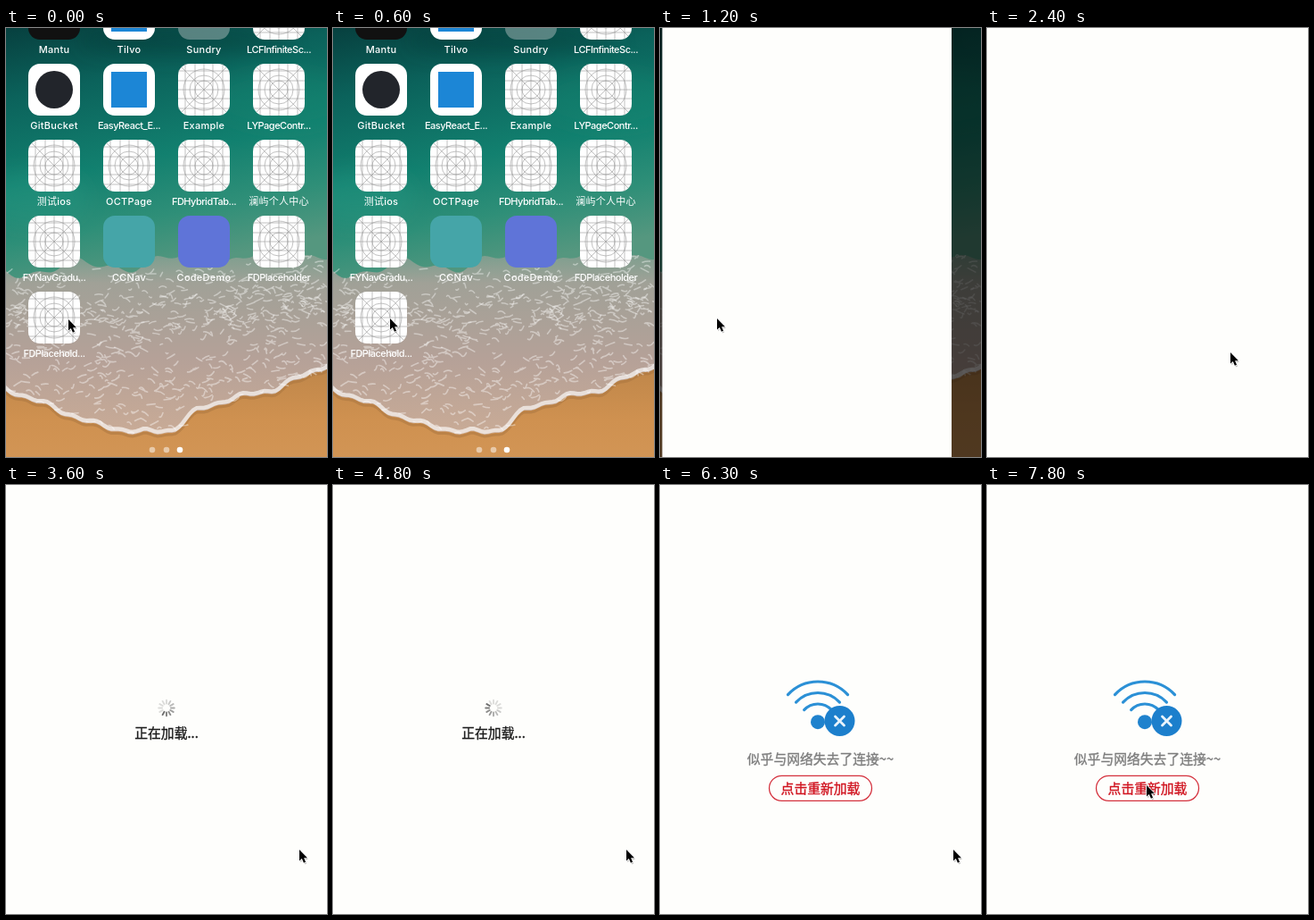
Recreate the animation shown at these times as an HTML page. Size 360 by 480 pixels, loop 8 s.

```html
<!DOCTYPE html>
<html lang="zh">
<head>
<meta charset="utf-8">
<title>Placeholder demo</title>
<style>
  html, body { margin: 0; width: 100%; height: 100%; overflow: hidden; background: #fefefc; }
  svg { display: block; width: 360px; height: 480px; }
  text { font-family: Inter, "Noto Sans CJK SC", "Noto Sans CJK", sans-serif; text-anchor: middle; }
  .label { font-size: 11px; font-weight: 500; letter-spacing: .25px; fill: #fff; }
  .tight { letter-spacing: -.5px; }
  .cjk { font-family: "Noto Sans CJK SC", "Noto Sans CJK", sans-serif; font-size: 14.8px; stroke-width: .35px; }
</style>
</head>
<body>
<svg viewBox="0 0 360 480">
  <defs>
    <linearGradient id="sea" x1="0" y1="0" x2=".15" y2="1">
      <stop offset="0" stop-color="#07403f"/>
      <stop offset=".16" stop-color="#0b625b"/>
      <stop offset=".36" stop-color="#12806f"/>
      <stop offset=".5" stop-color="#2f8f78"/>
      <stop offset=".62" stop-color="#55977f"/>
    </linearGradient>
    <linearGradient id="foam" x1="0" y1="0" x2="0" y2="1">
      <stop offset="0" stop-color="#9da69b" stop-opacity=".45"/>
      <stop offset=".2" stop-color="#a9a29a" stop-opacity=".9"/>
      <stop offset=".6" stop-color="#b5a198"/>
      <stop offset="1" stop-color="#c9ab96"/>
    </linearGradient>
    <linearGradient id="sand" x1="0" y1="0" x2="0" y2="1">
      <stop offset="0" stop-color="#bd8549"/>
      <stop offset=".6" stop-color="#cf9150"/>
      <stop offset="1" stop-color="#d29555"/>
    </linearGradient>
    <filter id="soft" x="-30%" y="-30%" width="160%" height="160%"><feGaussianBlur stdDeviation="12"/></filter>
    <g id="blank">
      <rect x="-29" y="-29" width="58" height="58" rx="13" fill="#fff"/>
      <g fill="none" stroke="#979797" stroke-width=".6">
        <path d="M-29 0H29M-29-10H29M-29 10H29M-29-21H29M-29 21H29M0-29V29M-10-29V29M10-29V29M-21-29V29M21-29V29M-25-25L25 25M-25 25L25-25"/>
        <circle r="10"/><circle r="16"/><circle r="23"/>
      </g>
    </g>
  </defs>

  <g id="home">
    <g id="wall"></g>
    <g id="icons"></g>
  </g>
  <g id="zoom">
    <rect width="360" height="480" fill="#000" opacity=".62"/>
    <rect x="2.5" width="324.5" height="480" fill="#fefefc"/>
  </g>
  <rect id="page" width="360" height="480" fill="#fefefc"/>
  <g id="loading">
    <g id="spinner" fill="none" stroke="#555" stroke-width="1.9" stroke-linecap="round"></g>
    <text class="cjk" x="180" y="283.2" fill="#1c1c1c" stroke="#1c1c1c">正在加载...</text>
  </g>
  <g id="error">
    <g id="waves" fill="none" stroke="#2b90d6" stroke-width="3.2" stroke-linecap="round"></g>
    <circle cx="177" cy="265.2" r="8" fill="#1f82cd"/>
    <circle cx="201.5" cy="264" r="17" fill="#1c7fcc"/>
    <path d="M196.5 259l10 10m0-10l-10 10" stroke="#e9f4fc" stroke-width="2.8" stroke-linecap="round"/>
    <text class="cjk" x="180" y="311.8" fill="#7d7d7d" stroke="#7d7d7d">似乎与网络失去了连接~~</text>
    <rect x="122.5" y="325.3" width="115" height="28" rx="14" fill="#fefefc" stroke="#d4303c" stroke-width="1.3"/>
    <text class="cjk" x="180" y="345" fill="#d0131f" stroke="#d0131f">点击重新加载</text>
  </g>
  <g id="cursor">
    <path d="M1.5 2.5v15l3.5-3 2.5 5.6 2.6-1.2-2.5-5.4h4.6z" fill="#000" opacity=".22"/>
    <path d="M0 0v15.3l3.5-3.2 2.5 5.8 2.6-1.1-2.4-5.6h4.8z" fill="#000" stroke="#fff" stroke-width="1.8" stroke-linejoin="round" paint-order="stroke"/>
  </g>
</svg>
<script>
const LOOP = 8000, STEP = 300;
const el = id => document.getElementById(id);
const show = (id, on) => { el(id).style.display = on ? '' : 'none'; };

let seed = 7;
const rand = () => {
  seed = (seed * 16807) % 2147483647;
  return seed / 2147483647;
};

function along(points, x) {
  let i = 1;
  while (i < points.length - 1 && points[i][0] < x) i++;
  const a = points[i - 1], b = points[i];
  const k = Math.min(1, Math.max(0, (x - a[0]) / (b[0] - a[0])));
  return a.slice(1).map((v, j) => v + (b[j + 1] - v) * k);
}

// Lower and upper edge of the surf: a slope with small scallops
const shorePts = [[-10, 402], [45, 424], [100, 446], [150, 455], [188, 452], [215, 430], [245, 419], [300, 407], [335, 391], [370, 374]];
const shore = x => along(shorePts, x)[0] + 2 * Math.sin(x / 9) + 1.5 * Math.sin(x / 4.3);
const crest = x => 272 - x * .06 + 7 * Math.sin(x / 17) + 4 * Math.sin(x / 7);

function edge(curve, shift = 0) {
  const pts = [];
  for (let x = -6; x <= 366; x += 4) pts.push(`${x} ${(curve(x) + shift).toFixed(1)}`);
  return pts;
}
const path = pts => 'M' + pts.join('L');

function flecks(count, from, to) {
  let d = '';
  for (let i = 0; i < count; i++) {
    const x = rand() * 360, top = crest(x);
    const y = top + (shore(x) - top) * (from + (to - from) * rand());
    const w = 2 + rand() * 8, h = rand() * 10 - 5;
    const bend = rand() * 6 - 3;
    d += `M${x.toFixed(1)} ${y.toFixed(1)}q${(w / 2).toFixed(1)} ${bend.toFixed(1)} ${w.toFixed(1)} ${h.toFixed(1)}`;
  }
  return d;
}

function drawWall() {
  const surf = path([...edge(crest), ...edge(shore).reverse()]) + 'Z';
  const line = (d, width, opacity) =>
    `<path d="${d}" fill="none" stroke="#fff" stroke-width="${width}" stroke-linecap="round" opacity="${opacity}"/>`;
  el('wall').innerHTML = `
    <rect width="360" height="480" fill="url(#sea)"/>
    <g filter="url(#soft)" opacity=".35">
      <ellipse cx="30" cy="190" rx="60" ry="30" fill="#2a9c86"/>
      <ellipse cx="310" cy="80" rx="80" ry="34" fill="#188b74"/>
      <ellipse cx="200" cy="15" rx="120" ry="16" fill="#04302f"/>
    </g>
    <path d="${path(edge(shore, -3))}V482H-6Z" fill="url(#sand)"/>
    <path d="${path(edge(shore, 2))}" fill="none" stroke="#a8753f" stroke-width="3" opacity=".5"/>
    <path d="${surf}" fill="url(#foam)"/>
    ${line(flecks(260, 0, .5), 1.5, .4)}
    ${line(flecks(380, .2, 1), 1.6, .4)}
    ${line(path(edge(shore, -3)), 4.5, .65)}`;
}

const tile = (fill, more = '') => `<rect x="-29" y="-29" width="58" height="58" rx="13" fill="${fill}"/>${more}`;
const blank = '<use href="#blank"/>';
const blue = '<rect x="-20" y="-20" width="40" height="40" fill="#1c86d6"/>';
const apps = [
  ['Mantu', tile('#111')], ['Tilvo', tile('#fff', blue)], ['Sundry', tile('rgba(170,185,185,.5)')], ['LCFInfiniteSc...', blank],
  ['GitBucket', tile('#fff', '<circle r="21" fill="#22252b"/>')], ['EasyReact_E...', tile('#fff', blue)], ['Example', blank], ['LYPageContr...', blank],
  ['测试ios', blank], ['OCTPage', blank], ['FDHybridTab...', blank], ['澜屿个人中心', blank],
  ['FYNavGradu...', blank], ['CCNav', tile('#45a5a8')], ['CodeDemo', tile('#5f74d8')], ['FDPlaceholder', blank],
  ['FDPlacehold...', blank + '<rect id="press" x="-29" y="-29" width="58" height="58" rx="13" fill="#2b2524" opacity=".6"/>']
];

function drawIcons() {
  const dots = [164, 180, 195].map((x, i) =>
    `<circle cx="${x}" cy="472" r="3.3" fill="#fff" opacity="${i === 2 ? 1 : .5}"/>`);
  el('icons').innerHTML = apps.map(([name, art], i) => {
    const x = 54 + i % 4 * 84, y = -16 + Math.floor(i / 4) * 85;
    const tight = name.length > 9 ? ' tight' : '';
    return `<g transform="translate(${x} ${y})">${art}<text class="label${tight}" y="43.5">${name}</text></g>`;
  }).join('') + dots.join('');
}

function drawWaves() {
  el('waves').innerHTML = [46, 33.5, 21].map(r => {
    const s = r * .73, c = r * .683;
    return `<path d="M${177 - s} ${266 - c}A${r} ${r} 0 0 1 ${177 + s} ${266 - c}"/>`;
  }).join('');
}

function drawSpinner() {
  el('spinner').innerHTML = Array.from({ length: 12 }, (_, i) =>
    `<path d="M180 244.6v-3.9" transform="rotate(${i * 30} 180 249.5)"/>`).join('');
}

function spin(t) {
  const head = 10 + Math.floor((t - 4800) * 12 / 1000);
  [...el('spinner').children].forEach((spoke, i) => {
    const age = (((head - i) % 12) + 12) % 12;
    spoke.setAttribute('opacity', Math.max(.2, .85 - age * .09));
  });
}

// time, x, y of the pointer tip
const pointer = [
  [0, 70, 326], [600, 64, 325], [1500, 64, 325], [1800, 104, 332], [2100, 200, 350], [2400, 273, 363],
  [2700, 307, 390], [3000, 325, 405], [3300, 329, 408], [6600, 329, 408], [6900, 306, 395],
  [7200, 246, 361], [7500, 194, 340], [7800, 179, 336]
];

function render(now) {
  const t = Math.floor((now % LOOP) / STEP) * STEP;
  const loading = t >= 3300 && t < 5400;
  show('home', t < 1500);
  show('icons', t < 1200);
  show('press', t >= 900);
  show('zoom', t === 1200);
  show('page', t >= 1500);
  show('loading', loading);
  show('error', t >= 5400);
  if (loading) spin(t);
  const [x, y] = along(pointer, t);
  el('cursor').setAttribute('transform', `translate(${x} ${y}) scale(.82)`);
}

drawWall();
drawIcons();
drawWaves();
drawSpinner();
const start = performance.now();
function tick() {
  render(performance.now() - start);
  requestAnimationFrame(tick);
}
tick();
</script>
</body>
</html>
```
